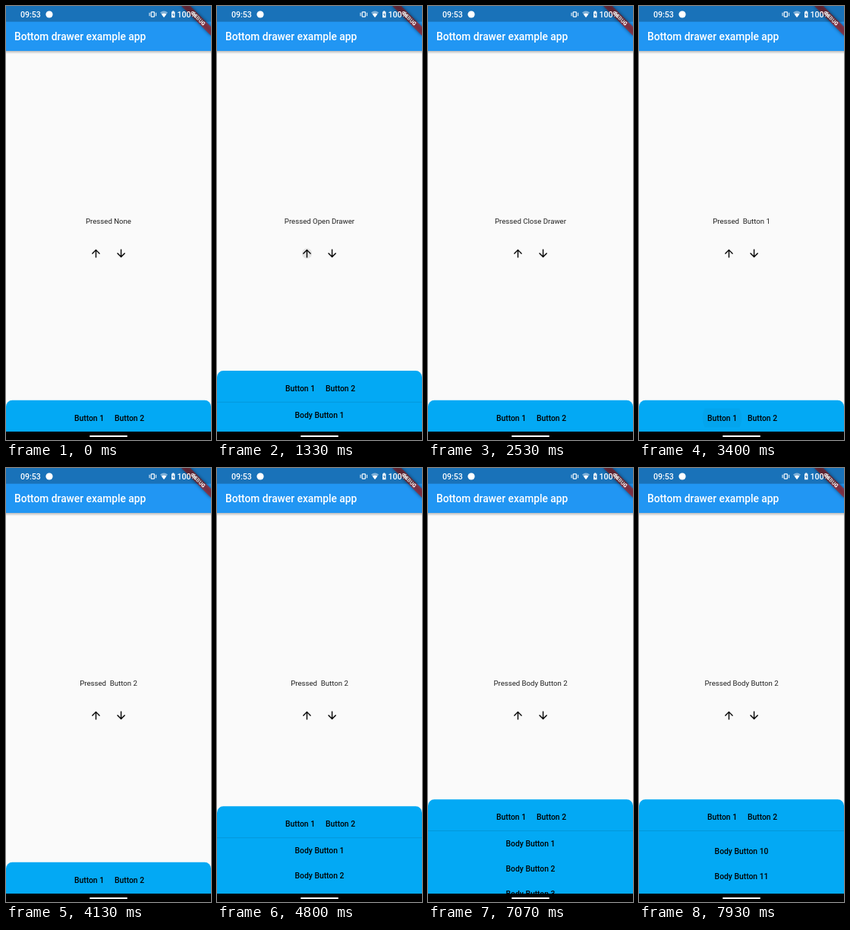
Recreate the animation shown at these times as an HTML page. Size 270 px wide and 570 px high, loop 8 s.

```html
<!DOCTYPE html>
<html lang="en">
<head>
<meta charset="utf-8">
<title>Bottom drawer</title>
<style>
html, body { margin: 0; width: 100%; height: 100%; overflow: hidden; background: #fafafa; }
svg { display: block; }
text { font-family: Roboto, sans-serif; }
.mid { text-anchor: middle; }
.btn { font-size: 10.33px; font-weight: 500; }
.white { fill: #fff; font-weight: 500; }
</style>
</head>
<body>
<svg width="270" height="570" viewBox="0 0 270 570">
  <defs>
    <linearGradient id="shade" x2="0" y2="1">
      <stop stop-color="#000" stop-opacity=".25"/>
      <stop offset="1" stop-color="#000" stop-opacity="0"/>
    </linearGradient>
    <filter id="blur" x="-20%" y="-60%" width="140%" height="220%"><feGaussianBlur stdDeviation="2"/></filter>
  </defs>
  <rect width="270" height="570" fill="#fafafa"/>

  <!-- app bar -->
  <rect y="59" width="270" height="4" fill="url(#shade)"/>
  <rect width="270" height="59" fill="#2196f3"/>
  <text class="white" x="11" y="45.4" font-size="13.77">Bottom drawer example app</text>

  <!-- page -->
  <text id="label" class="mid" x="135" y="285.8" font-size="9.64" fill="#212121" xml:space="preserve"></text>
  <path transform="translate(110.2 316.7) scale(.689)" d="M4 12l1.41 1.41L11 7.83V20h2V7.83l5.58 5.59L20 12l-8-8-8 8z"/>
  <path transform="translate(143.3 316.7) scale(.689)" d="M20 12l-1.41-1.41L13 16.17V4h-2v12.17l-5.58-5.59L4 12l8 8 8-8z"/>

  <!-- drawer -->
  <g id="drawer">
    <rect width="270" height="150" rx="8.3" fill="#03a9f4"/>
    <text class="btn mid" x="109.5" y="26.9">Button 1</text>
    <text class="btn mid" x="162.5" y="26.9">Button 2</text>
    <path d="M0 41.3H270" stroke="#000" stroke-opacity=".14" stroke-width=".8"/>
    <svg y="42" width="270" height="83"><g id="list"></g></svg>
  </g>
  <svg id="ripple"><circle/></svg>

  <!-- debug banner -->
  <g transform="translate(270 0) rotate(45)">
    <rect x="-27.6" y="19.3" width="55.2" height="8.3" opacity=".5" filter="url(#blur)"/>
    <rect x="-27.6" y="19.3" width="55.2" height="8.3" fill="#b71c1c" opacity=".63"/>
    <text class="mid" y="25.9" font-size="7" font-weight="900" fill="#fff">DEBUG</text>
  </g>

  <!-- status bar, above the app -->
  <rect width="270" height="20.7" opacity=".24"/>
  <g fill="#fff">
    <text class="white" x="19" y="14.8" font-size="10.6">09:53</text>
    <circle cx="57" cy="11" r="4.6"/>
    <rect x="191.2" y="7.8" width="4.2" height="6.4" rx=".8" fill="none" stroke="#fff" stroke-width="1.2"/>
    <path d="M189 8.8v4.4M197.6 8.8v4.4" stroke="#fff"/>
    <path d="M203 8.4Q208 4.8 213 8.4L208 15z" opacity=".45"/>
    <path d="M204.8 10.9Q208 8.6 211.2 10.9L208 15z"/>
    <path d="M218 7.6h1.2v-1h2v1h1.2v7.6h-4.4z"/>
    <path d="M220.5 8.6l-1.6 3h1.1v2.4l1.6-3h-1.1z" fill="#1970b6"/>
    <text class="white" x="225.5" y="14.8" font-size="10.6">100%</text>
  </g>

  <!-- navigation bar -->
  <rect y="559" width="270" height="11"/>
  <rect x="110" y="564" width="50" height="2" rx="1" fill="#fff"/>
</svg>
<script>
const LOOP = 8000, TICK = 200 / 3, CLOSED = 517.8, OPEN = 435.2, ROW = 33.07;
const $ = id => document.getElementById(id);
const ripple = $('ripple'), spot = ripple.firstChild;

// start, end, centre x, centre y, width, height, text
const taps = [
  [1267, 1530, 118.5, 325, 33, 33, 'Pressed Open Drawer'],
  [2130, 2530, 151.5, 325, 33, 33, 'Pressed Close Drawer'],
  [3000, 3530, 109.5, 541, 52, 25, 'Pressed  Button 1'],
  [3667, 4130, 162.5, 541, 52, 25, 'Pressed  Button 2'],
  [6000, 6400, 135, 493, 270, ROW, 'Pressed Body Button 1'],
  [6667, 7067, 135, 526, 270, ROW, 'Pressed Body Button 2']
];

for (let i = 0; i < 11; i++)
  $('list').innerHTML += `<text class="btn mid" x="135" y="${19.7 + i * ROW}">Body Button ${i + 1}</text>`;

const set = (el, attrs) => { for (const k in attrs) el.setAttribute(k, attrs[k]); };
const ramp = (t, a, b) => Math.min(1, Math.max(0, (t - a) / (b - a)));
const ease = (t, a, b) => 1 - (1 - ramp(t, a, b)) ** 2;

function draw(t) {
  const open = ease(t, 1260, 1530) - ease(t, 2170, 2530) + ease(t, 4540, 4930);
  set($('drawer'), { transform: `translate(0 ${CLOSED + (OPEN - CLOSED) * open})` });
  set($('list'), { transform: `translate(0 ${-287.6 * ease(t, 7490, 7930)})` });

  const done = taps.filter(tap => t >= tap[0] + 60).pop();
  const text = done ? done[6] : 'Pressed None';
  if ($('label').textContent !== text) $('label').textContent = text;

  const tap = taps.find(([a, b]) => t >= a && t < b);
  ripple.style.display = tap ? '' : 'none';
  if (!tap) return;
  const [a, b, x, y, width, height] = tap, u = ramp(t, a, b);
  set(ripple, { x: x - width / 2, y: y - height / 2, width, height });
  set(spot, { cx: width / 2, cy: height / 2, r: width / 2 * Math.min(1, u * 1.6), opacity: .12 * (1 - u) });
}

const start = performance.now();
function loop() {
  const t = (performance.now() - start) % LOOP;
  draw(Math.floor((t + 3.4) / TICK) * TICK + .1);
  requestAnimationFrame(loop);
}
loop();
</script>
</body>
</html>
```
